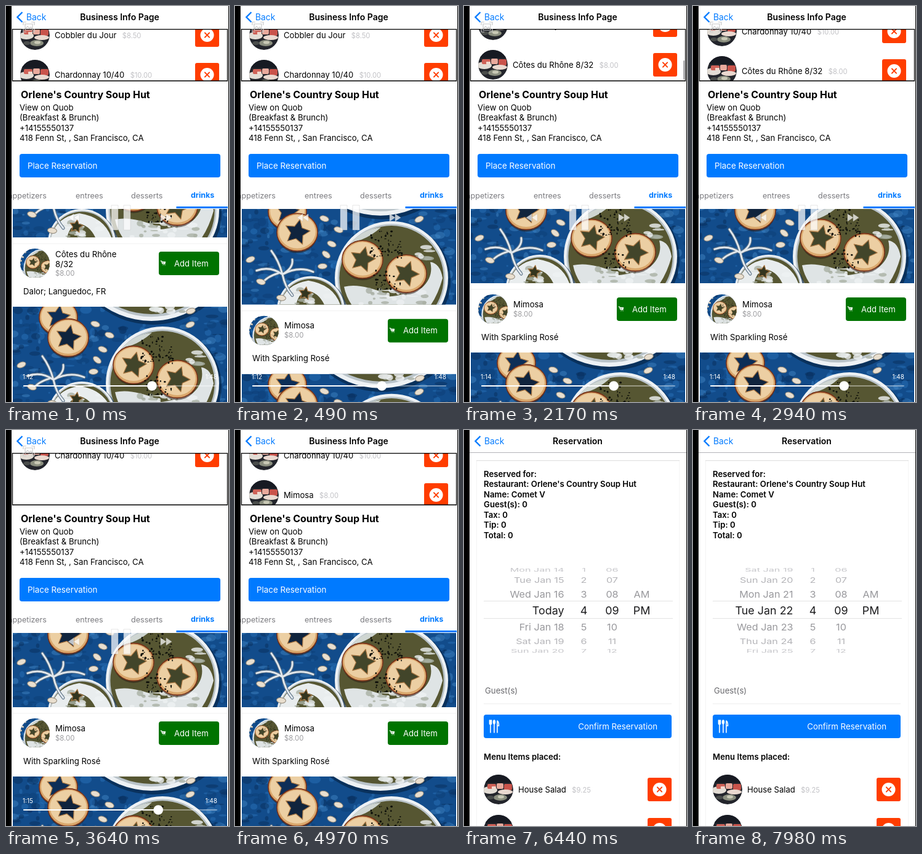
Write an HTML page that moves like this. It is 362 by 640 pixels and loops after 8 s.

```html
<!DOCTYPE html>
<html lang="en">
<head>
<meta charset="utf-8">
<title>Restaurant booking</title>
<style>
html, body { margin: 0; width: 100%; height: 100%; overflow: hidden; background: #fff; }
svg { display: block; width: 100vw; height: 100vh; font-family: Inter, Roboto, sans-serif; }
text { white-space: pre; }
</style>
</head>
<body>
<svg id="stage" viewBox="0 0 362 640"></svg>
<script>
const LOOP = 8000, BLUE = '#007aff', RED = '#ff3d00';
const PLACE = "Orlene's Country Soup Hut";
const stage = document.getElementById('stage');

// Markup helpers; text y is the middle of the capitals
const txt = (x, y, s, size = 13.2, attrs = '') =>
  `<text x="${x}" y="${y + size * 0.36}" font-size="${size}" ${attrs}>${s}</text>`;
const box = (x, y, w, h, fill, r = 0, attrs = '') =>
  `<rect x="${x}" y="${y}" width="${w}" height="${h}" rx="${r}" fill="${fill}" ${attrs}/>`;
const oval = (x, y, rx, ry, fill, attrs = '') =>
  `<ellipse cx="${x}" cy="${y}" rx="${rx}" ry="${ry}" fill="${fill}" ${attrs}/>`;
const disc = (x, y, r, fill, attrs) => oval(x, y, r, r, fill, attrs);
const path = (d, attrs) => `<path d="${d}" ${attrs}/>`;
const group = (attrs, body = '') => `<g ${attrs}>${body}</g>`;
const at = (x, y, body, more = '') => group(`transform="translate(${x} ${y}) ${more}"`, body);

// Timing helpers
const clamp = v => Math.max(0, Math.min(1, v));
const easeOut = v => 1 - (1 - v) ** 3;
const easeInOut = v => v * v * (3 - 2 * v);
const ramp = (t, a, b, ease = easeOut) => ease(clamp((t - a) / (b - a)));

function random(seed) {
  return () => (seed = (seed * 16807) % 2147483647) / 2147483647;
}

function star(x, y, r, fill, turn = 0) {
  let d = '';
  for (let i = 0; i < 10; i++) {
    const a = (i * 36 + turn - 90) * Math.PI / 180, q = i % 2 ? r * 0.5 : r;
    d += (i ? 'L' : 'M') + (x + q * Math.cos(a)).toFixed(1) + ' ' + (y + q * Math.sin(a)).toFixed(1);
  }
  return path(d + 'Z', `fill="${fill}" stroke="#a87642" stroke-width="1.2" stroke-linejoin="round"`);
}

const apple = (x, y, r, hole, turn) =>
  oval(x, y + 2, r, r * 0.96, '#2a1c14', 'opacity=".55"') +
  oval(x, y, r, r * 0.92, '#d9a76c', 'stroke="#7c3218" stroke-width="1.6"') +
  oval(x, y - 1, r * 0.9, r * 0.82, '#eccfa3') + star(x, y, r * 0.64, hole, turn);

const bowl = (x, y, r) =>
  disc(x + 2, y + 4, r + 2, '#04203f', 'opacity=".6"') + disc(x, y, r, '#edf1f4') +
  disc(x, y, r * 0.95, '#b9c3c9') + disc(x, y, r * 0.92, '#565632');

// Blobs spread at random over an area; look(rnd) gives [rx, ry, fill, opacity]
function scatter(rnd, count, x, y, w, h, look) {
  let s = '';
  for (let i = 0; i < count; i++) {
    const cx = (x + rnd() * w).toFixed(1), cy = (y + rnd() * h).toFixed(1);
    const [rx, ry, fill, alpha] = look(rnd);
    s += oval(cx, cy, rx.toFixed(1), ry.toFixed(1), fill, `opacity="${alpha}"`);
  }
  return s;
}

// Breakfast picture, 348 x 167
function photo() {
  const rnd = random(41);
  const tints = ['#06264d', '#0b396f', '#2f7cc4', '#4b93d2'];
  const mottle = r => [1.5 + r() * 9, 1 + r() * 6, tints[Math.floor(r() * 4)], 0.38];
  const seed = r => [0.6 + r() * 1.5, 0.6 + r() * 1.3, '#0c0e09', 1];
  const cream = r => [2 + r() * 9, 1 + r() * 4, r() < 0.6 ? '#eef1f2' : '#a9b0a4', 0.8];
  let s = box(0, 0, 348, 167, '#124c8b') + scatter(rnd, 260, 0, 0, 348, 167, mottle);

  s += bowl(225, -114, 137) + scatter(rnd, 9, 225, 0, 50, 8, cream);
  s += apple(74, 17, 31, '#0d2e57', 8) + apple(90, 50, 33, '#10243d', 12);

  s += bowl(243, 124, 92);
  s += path('M166 138Q184 134 206 140Q232 146 240 154Q262 152 292 140Q312 122 306 98Q322 100 326 124Q314 168 286 190H200Q172 168 166 138Z',
    'fill="#dfe4e5"');
  s += scatter(rnd, 26, 186, 142, 116, 24, cream) + scatter(rnd, 8, 286, 72, 24, 30, cream);
  s += path('M178 66Q196 46 226 42Q210 56 194 62Z', 'fill="#cfd6d2"');
  s += apple(196, 94, 33, '#42452a', 14) + apple(267, 117, 33, '#42452a', 20);
  s += scatter(rnd, 60, 208, 48, 52, 44, seed) + scatter(rnd, 34, 214, 110, 44, 32, seed);

  s += bowl(112, 176, 55);
  s += path('M62 167Q70 134 108 128Q148 134 160 167H134Q124 146 104 144Q92 150 88 167Z', 'fill="#e9edee"');
  s += scatter(rnd, 14, 76, 142, 70, 24, cream) + star(103, 149, 11, '#33351f', 10);

  const twig = 'M66 118Q46 104 24 112M66 118Q60 96 48 80M66 118Q92 104 116 114M66 118Q84 108 82 94M66 118Q70 138 82 152M60 116Q40 122 34 132';
  const round = 'fill="none" stroke-linecap="round"';
  s += path(twig, round + ' stroke="#5f7488" stroke-width="5"') + path(twig, round + ' stroke="#e3e9ee" stroke-width="2.8"');

  const nuts = [137, 86, 131, 105, 146, 69, 31, 130, 64, 156, 289, 7, 288, 29, 134, 28, 157, 46, 14, 94];
  for (let i = 0; i < nuts.length; i += 2) {
    const x = nuts[i], y = nuts[i + 1];
    s += oval(x, y, 7.5, 4.4, '#e9dfcf', `stroke="#8f8576" transform="rotate(${x * 7 % 80 - 40} ${x} ${y})"`);
  }
  return s;
}

// Round thumbnail of a platter
const platter = group('clip-path="url(#round)"',
  disc(0, 0, 24, '#23252c') + box(-24, -24, 48, 13, '#171a22') +
  oval(-14, 1, 12, 6, '#e3ddd5') + box(-18, -9, 14, 8, '#cf6258', 2) + box(-3, -10, 11, 9, '#e9aa9d', 2) +
  box(9, -9, 13, 10, '#c9534b', 2) + oval(11, 4, 12, 4, '#ead9d0') + box(-11, -5, 7, 4, '#f3d8cd', 1) +
  oval(3, 13, 11, 5, '#8b8f7f') + oval(-13, 13, 6, 3, '#4a4d4b') + oval(4, 12, 5, 2.4, '#c9c9b6'));

const thumb = group('clip-path="url(#round)"',
  '<use href="#photo" transform="translate(-70 -34) scale(.34)"/>');

const removeButton = (x, y) =>
  box(x - 19.5, y - 19, 39, 38, RED, 3) + disc(x, y, 11, '#fff') +
  path(`M${x - 3.6} ${y - 3.6}l7.2 7.2m0 -7.2l-7.2 7.2`, `stroke="${RED}" stroke-width="2" stroke-linecap="round"`);

const orderRow = (name, price, x, buttonX, size) =>
  at(x, 0, platter) + removeButton(buttonX, 0) +
  txt(x + 32, 0, `${name}<tspan dx="9.5" font-size="11.2" fill="#c2c2c6">${price}</tspan>`, size);

const cartIcon = path('M251 -3h1.8l1.6 5h4M253.2 -1.6h5.6l-.8 2.8h-4.2ZM255 4h.1M258 4h.1',
  'fill="#fff" stroke="#fff" stroke-width="1" stroke-linecap="round"');

function drinkRow(top, lines, price, note) {
  const first = lines.length > 1 ? 27 : 34;
  return at(0, top,
    path('M11 10H359', 'stroke="#f1f1f1"') + at(47, 42, thumb) +
    lines.map((l, i) => txt(80, first + 16 * i, l)).join('') +
    txt(80, first + 15.5 * lines.length, price, 11.4, 'fill="#9c9c9f"') +
    box(248, 23, 98, 38, '#007300', 4) + at(0, 41, cartIcon) +
    txt(273, 42, 'Add Item', 13.1, 'fill="#fff"') + txt(28, 87, note) +
    '<use href="#photo" x="11" y="112"/>');
}

function businessPage() {
  const info = ['View on Quob', '(Breakfast &amp; Brunch)', '+14155550137', '418 Fenn St, , San Francisco, CA'];
  const tab = (x, s, attrs = '') => txt(x, 306, s, 12.6, 'fill="#7c7c80" ' + attrs);
  return box(9, 37, 353, 603, '#fff') +
    group('clip-path="url(#cartArea)"',
      group('id="cart"',
        at(0, 47, orderRow('Cobbler du Jour', '$8.50', 47, 326.5, 13.1)) +
        at(0, 111, orderRow('Chardonnay 10/40', '$10.00', 47, 326.5, 13)) +
        group('id="wine"', at(0, 175, orderRow('Côtes du Rhône 8/32', '$8.00', 47, 326.5, 13.1))) +
        group('id="mimosa"', at(0, 175, orderRow('Mimosa', '$8.00', 47, 326.5, 13.1)))) +
      box(356, 88, 2, 31, '#8e8e93', 1, 'id="bar"')) +
    txt(24, 143, PLACE, 16, 'font-weight="700"') +
    info.map((s, i) => txt(22, 164 + 16.5 * i, s)).join('') +
    box(22, 239, 326, 38, BLUE, 4) + txt(35, 258, 'Place Reservation', 13.4, 'fill="#fff"') +
    tab(66, 'appetizers', 'text-anchor="end"') + tab(113, 'entrees') + tab(203, 'desserts') +
    txt(300, 306, 'drinks', 12.4, `font-weight="700" fill="${BLUE}"`) +
    group('clip-path="url(#listArea)"', group('id="list"',
      '<use href="#photo" x="11" y="207"/>' +
      drinkRow(374, ['Côtes du Rhône', '8/32'], '$8.00', 'Dalor; Languedoc, FR') +
      drinkRow(653, ['Mimosa'], '$8.00', 'With Sparkling Rosé'))) +
    box(276.5, 324, 83.5, 3, BLUE) +
    path('M10.5 37.5H359.5V121H10.5Z', 'fill="none" stroke="#000" stroke-width="1.3"');
}

function reservationPage() {
  const lines = ['Reserved for:', 'Restaurant: ' + PLACE, 'Name: Comet V', 'Guest(s): 0', 'Tax: 0', 'Tip: 0', 'Total: 0'];
  const bold = 'font-weight="600"';
  return box(9, 37, 353, 603, '#fff') +
    path('M20.5 640V49.5H349.5V640', 'fill="none" stroke="#f4f4f4"') +
    path('M20 49.5H350', 'stroke="#dedede"') +
    lines.map((s, i) => txt(32, 71 + 16.5 * i, s, 13.2, bold)).join('') +
    path('M32 276.5H339M32 304.5H339', 'stroke="#dcdcdc" stroke-width=".8"') +
    group('clip-path="url(#wheelArea)" id="wheels"') +
    txt(34, 421, 'Guest(s)', 13.2, 'fill="#6a6a6e"') + path('M32 442.5H337', 'stroke="#ededed"') +
    box(32, 460, 305, 38, BLUE, 4) +
    path('M41.5 469v5q0 2 1.5 2t1.5 -2v-5M43 469v20M49 474v15M54 470v19M54 470q2.5 1 2.5 8h-2.5',
      'fill="none" stroke="#fff" stroke-width="1.6" stroke-linecap="round"') +
    oval(49, 472, 2.2, 3.8, '#fff') +
    txt(314, 479, 'Confirm Reservation', 13.3, 'fill="#fff" text-anchor="end"') +
    txt(32, 528, 'Menu Items placed:', 13.2, bold) +
    at(0, 581, orderRow('House Salad', '$9.25', 56, 317.5, 13.1)) +
    at(0, 646, orderRow('Cobbler du Jour', '$8.50', 56, 317.5, 13.1));
}

function playerControls() {
  const arrows = 'M0 0L9 -6V6ZM9 0L18 -6V6Z', soft = 'fill="#fff" fill-opacity=".72" stroke="#b9b9b9" stroke-opacity=".5" stroke-width=".7"';
  return at(101, 342, path(arrows, soft)) + at(269, 342, path(arrows, soft), 'scale(-1 1)') +
    path('M171 322h11v40h-11ZM191 322h11v40h-11Z', soft) +
    path('M28 31v-5h5M41 26h5v5M46 37v5h-5M33 42h-5v-5M31 29h12v10h-12ZM31 37l4 -4 3 3 2 -2 3 3',
      'fill="none" stroke="#c9c9c9" stroke-width="1.2"') +
    box(28, 613, 315, 2, '#fff', 1, 'opacity=".4"') + box(28, 613, 210, 2, '#fff', 1, 'id="played"') +
    disc(238, 614, 7.8, '#fff', 'id="knob"') +
    txt(27, 599, '1:12', 10, 'id="clock" fill="#fff"') + txt(343, 599, '1:48', 10, 'fill="#fff" text-anchor="end"');
}

const area = (id, shape) => `<clipPath id="${id}">${shape}</clipPath>`;
stage.innerHTML = `<defs>${area('round', disc(0, 0, 24, '#000'))}${area('cartArea', box(9, 38, 351, 83, '#000'))}
  ${area('listArea', box(9, 328, 351, 312, '#000'))}${area('wheelArea', box(30, 222, 310, 139, '#000'))}
  ${area('frame', box(0, 0, 348, 167, '#000'))}
  <g id="photo" clip-path="url(#frame)">${photo()}</g></defs>` +
  box(0, 0, 362, 640, '#fff') + group('id="business"', businessPage()) +
  group('id="booking"', reservationPage()) +
  box(9, 0, 353, 37, '#fff') + path('M9 36.5H362', 'id="rule" stroke="#b4b4b8"') +
  path('M26.5 10L18.5 18L26.5 26', `fill="none" stroke="${BLUE}" stroke-width="2.4"`) +
  txt(33, 18, 'Back', 13.8, `fill="${BLUE}"`) +
  txt(184.5, 18, 'Business Info Page', 14, 'id="title1" font-weight="600" text-anchor="middle"') +
  txt(184.5, 18, 'Reservation', 14, 'id="title2" font-weight="600" text-anchor="middle"') +
  group('id="controls"', playerControls()) + box(0, 0, 9, 640, '#000') + box(361, 0, 1, 640, '#000');

const el = {};
stage.querySelectorAll('[id]').forEach(n => el[n.id] = n);
const set = (n, name, v) => el[n].setAttribute(name, v);
const move = (n, x, y) => set(n, 'transform', `translate(${x} ${y})`);
const show = (n, on) => set(n, 'display', on ? 'inline' : 'none');

// Picker column: rows on a cylinder, pos is the row in front
function wheel(x, pos, label, anchor = 'middle') {
  const shades = ['#1c1c1e', '#98989c', '#b4b4b8', '#c6c6ca'];
  let s = '';
  for (let i = Math.round(pos) - 3; i <= Math.round(pos) + 3; i++) {
    const name = label(i), d = i - pos, a = d * 0.365;
    if (!name || Math.abs(a) > 1.4) continue;
    const near = Math.min(3, Math.round(Math.abs(d)));
    s += at(x, 292 + 74 * Math.sin(a),
      txt(0, 0, name, near ? 16.2 : 17.9, `fill="${shades[near]}" text-anchor="${anchor}"`),
      `scale(1 ${Math.cos(a)})`);
  }
  return s;
}

const DAYS = ['Sun', 'Mon', 'Tue', 'Wed', 'Thu', 'Fri', 'Sat'];
const dayName = i => i === 17 ? 'Today' : `${DAYS[(i + 1) % 7]} Jan ${i}`;

function render(t) {
  // Menu and order lists
  move('list', 0, -205 * ramp(t, 120, 950));
  move('cart', 0, -80 * ramp(t, 1500, 2150) + 10 * ramp(t, 2300, 2700));
  show('wine', t < 3150);
  show('mimosa', t >= 4300);
  set('bar', 'opacity', 0.8 * ramp(t, 1500, 1600) * (1 - ramp(t, 2700, 3000)));

  // Video player
  const x = 237 + 2.8 * t / 1000;
  set('controls', 'opacity', 1 - ramp(t, 4050, 4350, easeInOut));
  set('played', 'width', x - 28);
  set('knob', 'cx', x);
  el.clock.textContent = '1:' + (12 + Math.floor(t / 1000));

  // Page change
  const p = ramp(t, 5780, 6280);
  move('business', -106 * p, 0);
  move('booking', 353 * (1 - p), 0);
  show('business', p < 1);
  show('booking', p > 0);
  move('title1', -90 * p, 0);
  move('title2', 120 * (1 - p), 0);
  set('title1', 'opacity', 1 - clamp(p * 1.6));
  set('title2', 'opacity', p);
  set('rule', 'opacity', p);

  if (p > 0) {
    el.wheels.innerHTML =
      wheel(162.5, 17 + 5 * ramp(t, 6850, 7700), dayName, 'end') +
      wheel(194.5, 4, i => '' + i) +
      wheel(240.5, 9, i => String(i).padStart(2, '0')) +
      wheel(288.5, 1, i => ['AM', 'PM'][i]);
  }
}

const start = performance.now();
function tick(now) {
  render(Math.max(0, now - start) % LOOP);
  requestAnimationFrame(tick);
}
render(0);
requestAnimationFrame(tick);
</script>
</body>
</html>
```
